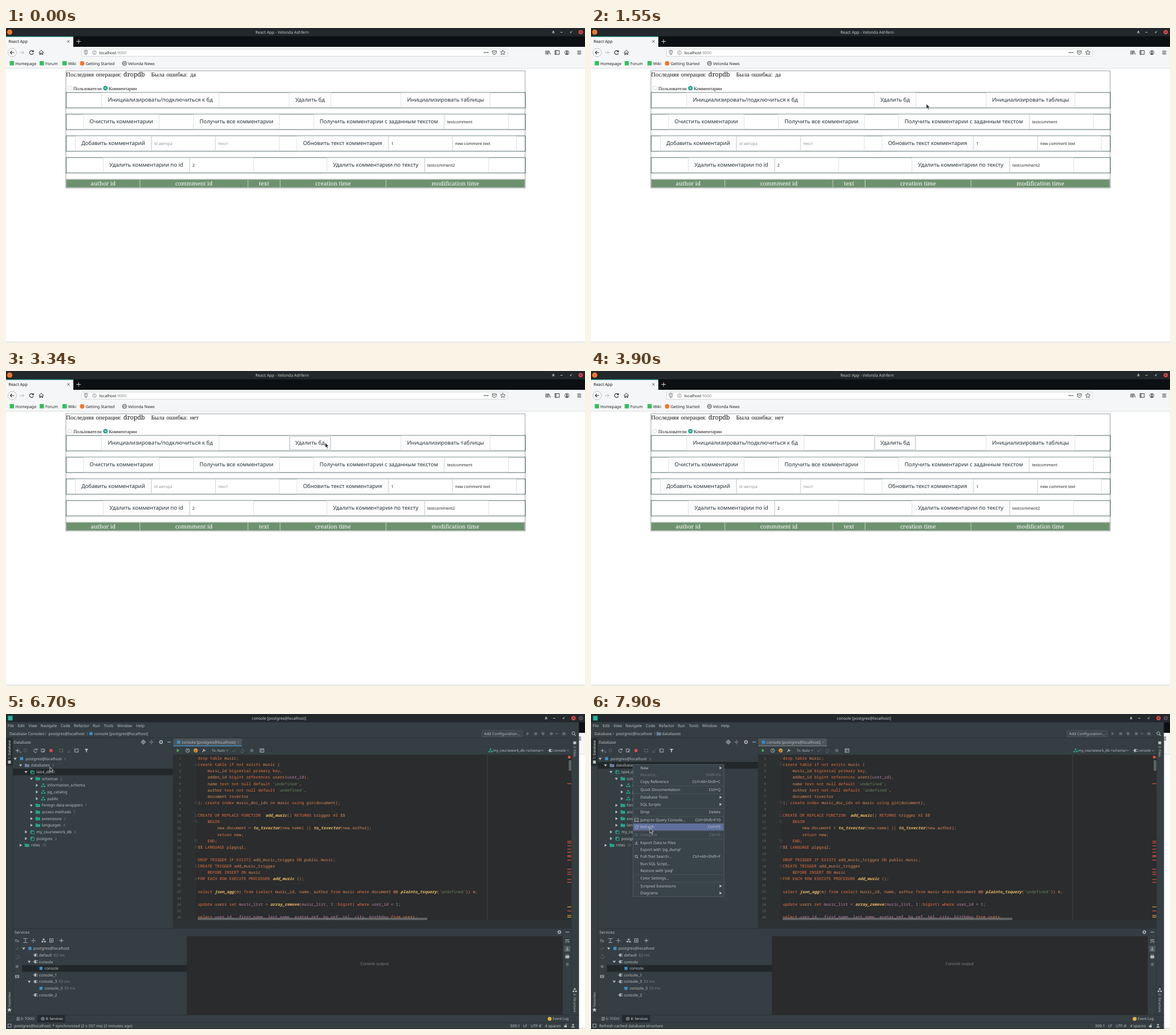
Recreate the animation shown at these times as an HTML page. Size 1015 px wide and 552 px high, loop 8 s.

```html
<!DOCTYPE html>
<html lang="ru">
<head>
<meta charset="utf-8">
<title>Console demo</title>
<style>
html, body { margin: 0; width: 100%; height: 100%; overflow: hidden; background: #fff; }
svg { display: block; width: 1015px; height: 552px; text-rendering: geometricPrecision; }
text { font-family: "Noto Sans", "Open Sans", sans-serif; white-space: pre; }
.serif { font-family: "Liberation Serif", serif; word-spacing: .09em; }
.head { font-family: "Noto Serif", serif; }
.code { font-family: "Noto Sans Mono", "DejaVu Sans Mono", monospace; }
.fn { fill: #f0bd68; font-weight: 600; font-style: italic; }
.kw { fill: #ea713f; } .id { fill: #e08a58; } .str { fill: #6a8759; }
.num { fill: #7aa5c8; } .col { fill: #c07fae; }
</style>
</head>
<body>
<svg id="stage" viewBox="0 0 1015 552"></svg>
<script>
const LOOP = 8000;
const text = (x, y, s, size = 6.87, fill = '#bcc2c4', extra = '') =>
  `<text x="${x}" y="${y}" font-size="${size}" fill="${fill}" ${extra}>${s}</text>`;
const rect = (x, y, w, h, fill, extra = '') =>
  `<rect x="${x}" y="${y}" width="${w}" height="${h}" fill="${fill}" ${extra}/>`;
const frame = (x, y, w, h, stroke, fill = 'none', sw = 1) =>
  rect(x, y, w, h, fill, `stroke="${stroke}" stroke-width="${sw}"`);
const circle = (x, y, r, fill, extra = '') => `<circle cx="${x}" cy="${y}" r="${r}" fill="${fill}" ${extra}/>`;
const line = (d, stroke, w = 1) => `<path d="${d}" fill="none" stroke="${stroke}" stroke-width="${w}"/>`;
const shape = (d, fill) => `<path d="${d}" fill="${fill}"/>`;
const during = (from, to, body) => `<g data-on="${from} ${to}">${body}</g>`;
const middle = 'text-anchor="middle"', end = 'text-anchor="end"';

/* ---------- browser ---------- */
function windowButtons(x, closeFill) {
  const c = '#cfd3d5';
  return shape(`M${x - 2} 7.2h4l-2-2.6zM${x - 2} 8h4v.9h-4z`, c) + line(`M${x + 12.5} 7.5h3.5`, c, .9) +
    line(`M${x + 29.5} 8.5l3.5-3.5M${x + 30} 6.2v2h2`, c, .7) +
    circle(x + 48, 7.2, 3.8, closeFill) + line(`M${x + 46.5} 5.7l3 3m0-3l-3 3`, '#24292c', .9);
}

function button(x, w, y, label) {
  return frame(x + .5, y + .5, w - 1, 25.5, '#d9dcdc', '#fcfcfc', .8) +
    text(x + w / 2, y + 16.3, label, 9.5, '#263238', middle);
}
function input(x, y, value, fill = '#222') {
  return frame(x + .5, y + .5, 111.5, 25.5, '#d4d6d6', '#fff', .8) + text(x + 4.8, y + 15.6, value, 7.05, fill);
}

function browser() {
  const ink = '#2b2f33', hint = '#8e9296';
  let s = rect(0, 0, 1015, 552, '#fff') + rect(0, 0, 1015, 15, '#22282b') + rect(0, 14.5, 1015, 18.5, '#0d1012') +
    circle(6.5, 7.2, 4.6, '#f2762e') +
    text(484, 9.7, 'React App - Velonda Ashfern', 7.05, '#c9cdcf', middle) + windowButtons(959.5, '#e0484a') +
    rect(0, 15, 118, 18, '#f5f6f7') + rect(0, 14.6, 118, 1.2, '#2aa693') +
    text(4.5, 26.3, 'React App', 7.05, '#111') + line('M107.4 21.5l4 4m0-4l-4 4', '#333', .9) +
    line('M123.5 23.5h7.5m-3.75-3.75v7.5', '#e8e8e8', .9) +
    rect(0, 33, 1015, 37, '#f5f6f7') + rect(0, 70, 1015, .7, '#cfd1d3');
  s += circle(10.8, 43, 7.3, '#fff', 'stroke="#9a9da0" stroke-width=".7"') +
    line('M14.5 43h-7m3-3l-3 3 3 3', ink, 1.1) + line('M24 43h7.5m-3-3l3 3-3 3', '#b4b6b8', 1) +
    line('M47.7 41.2a3.4 3.4 0 1 0 .3 3M48.2 39v2.6h-2.6', ink, 1.1) +
    line('M57.5 43l4.3-4 4.3 4M59 42.5v4h1.7v-2.6h2.2v2.6h1.7v-4', ink, 1) +
    rect(132.5, 37, 746.5, 12.4, '#fff', 'rx="1" stroke="#c4c6c8" stroke-width=".7"') +
    line('M137 39.8l3-.8 3 .8c0 4-1 6-3 7.2-2-1.2-3-3.2-3-7.2zM140 39v7.5', '#55595d', .8) +
    circle(155, 43.1, 3.3, 'none', 'stroke="#666" stroke-width=".7"') + line('M155 42.5v2.4M155 41v.8', '#666', .8) +
    text(163.5, 45.6, 'localhost<tspan fill="#86898c">:9000</tspan>', 7.05, '#1d2022');
  for (const x of [838.5, 841.5, 844.5]) s += circle(x, 43, .9, ink);
  s += line('M852.5 40h7v2.6c0 5-7 5-7 0zM854.2 41.8l1.8 1.8 1.8-1.8', ink, .9) +
    line('M871 38.8l1.2 2.8 3 .2-2.3 2 .8 3-2.7-1.7-2.7 1.7.8-3-2.3-2 3-.2z', ink, .8) +
    line('M946.3 39.5v7M948.5 39.5v7M950.5 39.5v7M951.8 39.8l2.2 6.6', ink, 1) +
    frame(962.5, 39.6, 7.4, 6.6, ink, 'none', .9) + rect(962.5, 39.6, 3, 6.6, ink, 'opacity=".4"') +
    circle(983.3, 43, 3.7, 'none', `stroke="${ink}" stroke-width=".8"`) + circle(983.3, 42, 1.4, ink) +
    shape('M981 45.2q2.3-2.2 4.6 0q-2.3 1.8-4.6 0z', ink) +
    line('M1001.5 40.5h6.8m-6.8 2.5h6.8m-6.8 2.5h6.8', ink, 1);
  for (const [x, label] of [[6.5, 'Homepage'], [59, 'Forum'], [99, 'Wiki']])
    s += rect(x, 58, 7.5, 7.5, '#35bf5c') + text(x + 10, 64.5, label, 7.05, '#1d2022');
  s += circle(133.5, 62, 3.9, '#f2762e') + text(139.7, 64.5, 'Getting Started', 7.05, '#1d2022') +
    circle(207.7, 62, 3.7, 'none', 'stroke="#444" stroke-width=".8"') +
    line('M204 62h7.4M207.7 58.3v7.4M206 58.8q-1.4 3.2 0 6.4M209.4 58.8q1.4 3.2 0 6.4', '#444', .5) +
    text(214, 64.5, 'Velonda News', 7.05, '#1d2022');

  s += frame(105, 75, 805, 205, '#8f9393', 'none', .9) +
    text(105.3, 85.4, 'Последняя операция:', 10.6, '#111', 'class="serif"') +
    text(205.8, 85.4, 'dropdb', 10.75, '#111', 'class="head"') +
    text(254.5, 85.4, 'Была ошибка:', 10.6, '#111', 'class="serif"') +
    during(0, 2170, text(322.7, 85.4, 'да', 10.6, '#111', 'class="serif"')) +
    during(2170, LOOP, text(322.7, 85.4, 'нет', 10.6, '#111', 'class="serif"')) +
    circle(112, 105.4, 3.6, '#fff', 'stroke="#cdd0d0" stroke-width=".8"') +
    text(118, 109.3, 'Пользователи', 8.46, '#111', 'class="serif"') +
    circle(174.3, 105.4, 3.9, '#1fa58a') + circle(174.3, 105.4, 1.2, '#d9f2ec') +
    text(180.2, 109.3, 'Комментарии', 8.46, '#111', 'class="serif"');
  for (const y of [113, 151, 189, 227]) s += frame(105.5, y, 805, 27, '#3c5a5a', 'none', .9);
  s += button(167, 207, 113, 'Инициализировать/подключиться к бд') + button(496, 74, 113, 'Удалить бд') +
    button(692, 157, 113, 'Инициализировать таблицы') +
    button(135.5, 133.5, 151, 'Очистить комментарии') + button(328, 152, 151, 'Получить все комментарии') +
    button(538.5, 230, 151, 'Получить комментарии с заданным текстом') + input(768.5, 151, 'testcomment') +
    button(121, 134, 189, 'Добавить комментарий') + input(255, 189, 'id автора', hint) + input(367, 189, 'текст', hint) +
    button(509.5, 161, 189, 'Обновить текст комментария') + input(670.5, 189, '1') + input(782.5, 189, 'new comment text') +
    button(170, 152, 227, 'Удалить комментарии по id') + input(322, 227, '2') +
    button(562, 172, 227, 'Удалить комментарии по тексту') + input(734, 227, 'testcomment2');
  s += during(1940, 2060, rect(497, 114, 72, 24.5, '#b9c2c2', 'opacity=".35"')) +
    during(1980, LOOP, frame(497.6, 114.8, 70.8, 23, '#c4c9c9', 'none', .9));
  s += rect(105.5, 265, 804.5, 15, '#c9d3c9') + frame(105.5, 265, 804.5, 15, '#8f9393', 'none', .7);
  const cells = [106.2, 235.2, 424.6, 481, 666.6, 909.8];
  ['author id', 'commment id', 'text', 'creation time', 'modification time'].forEach((label, i) => {
    const x = cells[i], w = cells[i + 1] - x - 1;
    s += rect(x, 266, w, 13, '#6d926e') + text(x + w / 2, 275.8, label, 9.85, '#fff', `class="head" ${middle}`);
  });
  for (let i = 0; i < 4; i++) s += rect(0, 548 + i, 1015, 1, '#000', `opacity="${.025 * (i + 1)}"`);
  return s;
}

/* ---------- database IDE ---------- */
const panel = '#353e42', editor = '#2a2c2d', selected = '#22282a', ink = '#b9c0c2', dim = '#7d878b', teal = '#23a38b', blue = '#3a8fcb';
const small = 6.1, ideWidth = 1004.3;

const sql = `drop table music;
create table if not exists music (
    music_id bigserial primary key,
    adder_id bigint references users(user_id),
    name text not null default 'undefined',
    author text not null default 'undefined',
    document tsvector
); create index music_doc_idx on music using gin(document);

CREATE OR REPLACE FUNCTION  add_music() RETURNS trigger AS $$
    BEGIN
        new.document = to_tsvector(new.name) || to_tsvector(new.author);
        return new;
    END;
$$ LANGUAGE plpgsql;

DROP TRIGGER IF EXISTS add_music_trigger ON public.music;
CREATE TRIGGER add_music_trigger
    BEFORE INSERT ON music
FOR EACH ROW EXECUTE PROCEDURE add_music ();

select json_agg(m) from (select music_id, name, author from music where document @@ plainto_tsquery('undefined')) m;

update users set music_list = array_remove(music_list, 1::bigint) where user_id = 1;

select user_id,  first_name, last_name, avatar_ref, bg_ref, tel, city, birthday from users;`.split('\n');

const kinds = [
  ['str', /^'/], ['num', /^\d/],
  ['fn', /^(to_tsvector|json_agg|add_music|array_remove|plainto_tsquery)$/],
  ['col', /^(user_id|first_name|last_name|avatar_ref|bg_ref|tel|city|birthday|music_list)$/],
  ['kw', /^([A-Z]+|drop|table|create|if|not|exists|primary|key|references|null|default|text|bigint|bigserial|index|on|using|return|select|from|where|update|set)$/],
  ['id', /./]
];
const paint = row => row.replace(/'[^']*'|\w+|[^\w\s']+/g, w =>
  `<tspan class="${kinds.find(k => k[1].test(w))[0]}">${w}</tspan>`);

const down = (x, y) => shape(`M${x - 2.6} ${y - 1.6}h5.2l-2.6 4z`, ink);
const right = (x, y) => shape(`M${x - 1.6} ${y - 2.6}v5.2l4-2.6z`, ink);
const folder = (x, y, c) => shape(`M${x - 4} ${y - 3}h3l1 1h4v5h-8z`, c);
const store = (x, y, c) => rect(x - 3.5, y - 3, 5.5, 6, c, 'rx="1"') + frame(x - 1.8, y - 1.4, 5, 4.6, c, panel, .9);
const blocks = (x, y, c) => rect(x - 1.5, y - 3.3, 3, 2.6, c) + rect(x - 3.7, y + .6, 3, 2.6, c) + rect(x + .7, y + .6, 3, 2.6, c);
const schema = (x, y) => blocks(x, y, teal);
const plug = (x, y) => line(`M${x - 4} ${y}h2.2M${x + 1} ${y - 1.6}h3M${x + 1} ${y + 1.6}h3`, ink, .9) + rect(x - 2, y - 2.8, 3, 5.6, ink, 'rx="1"');
const mark = (x, y) => rect(x - 2.7, y - 2.7, 5.4, 5.4, blue);

function dataTree() {
  const rows = [
    [0, 'd', 'postgres@localhost', 3, 'm'], [1, 'd', 'databases', 3, 'f'], [2, 'd', 'lab4_db', 3, 's'],
    [3, 'd', 'schemas', 3, 'F'], [4, 'r', 'information_schema', '', 'c'], [4, 'r', 'pg_catalog', '', 'c'],
    [4, 'r', 'public', '', 'c'], [3, 'r', 'foreign data wrappers', 1, 'F'], [3, 'r', 'access methods', 7, 'F'],
    [3, 'r', 'extensions', 2, 'F'], [3, 'r', 'languages', 4, 'F'], [2, 'r', 'my_coursework_db', 3, 's'],
    [2, 'r', 'postgres', 3, 's'], [1, 'r', 'roles', 10, 'F']
  ];
  const icons = { m: mark, f: (x, y) => folder(x, y, '#6d7fa0'), F: (x, y) => folder(x, y, teal), s: (x, y) => store(x, y, teal), c: schema };
  let s = during(0, 6960, rect(12, 95.7, 281, 11.7, selected)) + during(6960, LOOP, rect(12, 84, 281, 11.7, selected));
  rows.forEach(([depth, arrow, label, count, icon], i) => {
    const x = 16 + depth * 9.5, y = 78.3 + i * 11.67;
    s += (arrow === 'd' ? down : right)(x, y) + icons[icon](x + 11.3, y) +
      text(x + 18.3, y + 2.4, `${label}<tspan dx="4" font-size="${small}" fill="${dim}">${count}</tspan>`);
  });
  return s;
}

function services() {
  const rows = [[0, 'd', 'postgres@localhost', ''], [1, '', 'default', '82 ms'], [1, 'd', 'console', ''], [2, '', 'console', ''],
    [1, '', 'console_1', ''], [1, 'd', 'console_3', '53 ms'], [2, '', 'console_3', '53 ms'], [1, '', 'console_2', '']];
  let s = rect(0, 376, 1003, 151, panel) + rect(12, 375.5, 991, .8, '#293033') + text(15, 384.7, 'Services') +
    rect(317, 389.5, 659, 138, '#2a2b2c') + rect(28, 440, 289, 11.7, selected) +
    text(646, 439.8, 'Console output', 6.87, '#7f8688', middle);
  rows.forEach(([depth, arrow, label, time], i) => {
    const x = 31 + depth * 9.7, y = 410.8 + i * 11.65;
    if (arrow) s += down(x, y);
    s += (depth === 1 ? plug : mark)(x + 11, y) +
      text(x + 17, y + 2.4, `${label}<tspan dx="3" fill="${dim}">${time}</tspan>`);
  });
  s += text(15.5, 399.7, 'Tx', 7, ink) + line('M30.5 393.5h7M30.5 400.5h7M34 394.8v4.4M44.5 397h7M48 393v2.6M48 401v-2.6', ink, .9) +
    blocks(66, 397, ink) + frame(76.5, 393.8, 6, 6, ink, 'none', .9) + line('M79.5 395v3.6M77.7 396.8h3.6', ink, .8) +
    line('M93.5 397h7M97 393.5v7', ink, 1) + line('M17 411l1.8 2 3.4-4.2M17.2 426a3 3 0 1 0 1-2.6', '#687277', .9) +
    rect(17, 440, 5, 5, '#626c70') + frame(16.5, 458, 6, 4, ink, 'none', .9) + line('M16.5 460h6', ink, .8) +
    circle(970, 382.2, 2.3, 'none', `stroke="${ink}" stroke-width="1.5"`) + line('M981 382.2h6', ink, 1) +
    line('M980.5 395.5h7M980.5 398h6q2 1.5-1 2.5h-1M980.5 400.5h2', ink, .9) +
    rect(978.5, 406, 11, 11, '#4c575c') + line('M981 414h6M984 408v4.5m-2-2l2 2 2-2', ink, .9) +
    rect(980.5, 423.5, 7, 4, ink) + frame(982, 421.8, 4, 6.4, ink, 'none', .7) + rect(981.8, 436, 4.5, 5.4, '#626c70');
  return s;
}

function editorPane() {
  let s = rect(293, 56.5, 698, 305, editor) + rect(293, 42, 710, 14.5, panel) + rect(293, 56.5, 710, 15, panel) +
    rect(293, 43, 120.5, 13, '#4a555a') + during(0, 7260, rect(293, 55, 120.5, 1.6, '#4a88b8')) +
    during(7260, LOOP, rect(293, 55, 120.5, 1.6, '#6c777c')) + mark(302.5, 49.3) +
    text(308, 51.8, 'console [postgres@localhost]') + line('M405.5 47.7l3.2 3.2m0-3.2l-3.2 3.2', dim, .7) +
    rect(293, 71.5, 40, 290, '#2d3031') + line('M844 71.5V361', '#45494a', .8);
  for (const n of [2, 8, 10, 11, 14, 15, 18, 20])
    s += frame(331.4, 75.8 + (n - 1) * 11.12, 3.4, 3.4, '#565c5f', editor, .5);
  sql.forEach((row, i) => {
    const y = 80.1 + i * 11.12;
    s += text(307, y - .2, i + 1, 5.8, '#697073', `class="code" ${end}`) +
      text(336.3, y, paint(row), 7.055, '#d0d0d0', 'class="code"');
  });
  s += rect(336, 357, 402.5, 4, '#8a8f91', 'opacity=".55"') + rect(293, 361, 698, 14.5, '#2d3335') +
    rect(986.5, 81, 4.5, 18.5, '#777d80', 'opacity=".7"') + circle(987.5, 75.5, 2.6, '#d9503f');
  for (const y of [122, 223, 226, 231, 237, 242, 248, 250, 256, 272, 277, 281, 290, 295, 345]) s += rect(984, y - .6, 7, 1.3, '#d9503f');
  for (const y of [338, 353, 356]) s += rect(984, y - .6, 7, 1.3, '#d9a23c');
  s += shape('M299.5 61l5 3-5 3z', '#4fae56') + circle(318.5, 64, 3.2, 'none', `stroke="${ink}" stroke-width=".9"`) +
    line('M318.5 62v2h1.6', ink, .8) + circle(332.5, 64, 3.4, '#e5a33c') + text(332.5, 66, 'p', 5.5, '#333', middle) +
    line('M344 66.7l4-4m-.8-1.5a1.8 1.8 0 1 0 2.4 2.4', ink, 1.2) + text(360.5, 66.2, 'Tx: Auto', small) +
    line('M386 63l1.7 1.8 1.7-1.8', ink, .8) + line('M397 64l2 2.2 4-4.4M411.5 65.5a2.7 2.7 0 1 0 .7-2.6', '#687277', .9) +
    rect(428.5, 61.5, 5, 5, '#626c70') + frame(445.5, 61, 6.5, 6, ink, 'none', .9) + line('M445.5 63h6.5M448 63v4', ink, .7) +
    schema(849.5, 64) + text(854, 66.2, 'my_coursework_db.&lt;schema&gt;', small) + line('M939.5 63.2l1.6 1.6 1.6-1.6', ink, .7) +
    plug(954, 64) + text(959.3, 66.2, 'console', small) + line('M983.5 63.2l1.6 1.6 1.6-1.6', ink, .7);
  return s;
}

function ide() {
  let s = rect(0, 0, ideWidth, 552, panel) + rect(0, 0, 1015, 14.5, '#22282b') + rect(3.5, 3.3, 8, 8, '#25b69b');
  s += during(0, 5760, text(478.5, 9.7, 'console [postgres@localhost]', 6.9, '#8d9395', middle) +
    windowButtons(946.8, '#858b8e') + circle(1007.5, 7.2, 3.8, '#e0484a') + line('M1006 5.7l3 3m0-3l-3 3', '#24292c', .9));
  s += during(5760, LOOP, text(478.5, 9.7, 'console [postgres@localhost]', 6.9, '#d0d4d6', middle) +
    windowButtons(946.8, '#e0484a') + circle(1007.5, 7.2, 3.8, '#4c5356') + line('M1006 5.7l3 3m0-3l-3 3', '#24292c', .9));
  const menus = [[3, 'File'], [20.5, 'Edit'], [39.5, 'View'], [60.5, 'Navigate'], [96, 'Code'], [119, 'Refactor'],
    [152, 'Run'], [171.5, 'Tools'], [195, 'Window'], [228, 'Help']];
  for (const [x, label] of menus) s += text(x, 23.3, label);

  const sep = x => line(`M${x} 31.8l2 2.6-2 2.6`, dim, .8);
  s += during(0, 7600, text(6, 37, 'Database Consoles') + sep(68.5) + text(74.5, 37, 'postgres@localhost') + sep(141.5) +
    mark(149, 34.4) + text(154.5, 37, 'console [postgres@localhost]')) +
    during(7600, LOOP, text(6, 37, 'Database') + sep(38) + text(44, 37, 'postgres@localhost') + sep(111) +
    folder(119, 34.4, '#6d7fa0') + text(124.5, 37, 'databases'));
  s += rect(834.5, 29, 70.5, 11, '#3b454a', 'rx="1.5" stroke="#5c676c" stroke-width=".7"') +
    text(869.7, 36.9, 'Add Configuration...', 6.75, ink, middle) + shape('M912.5 31.5l5 3-5 3z', '#626c70') +
    circle(928.5, 34.5, 2.6, '#626c70') + line('M925 32l7 5m0-5l-7 5', '#626c70', .7) +
    shape('M939 31.5l5 1v3l-2.5 2.5-2.5-2.5z', '#626c70') + circle(956, 34.5, 2.8, '#626c70') +
    line('M964 33.6l1.6 1.6 1.6-1.6', ink, .8) + rect(975.5, 32, 5, 5, '#626c70') +
    circle(994.5, 33.8, 2.6, 'none', `stroke="${ink}" stroke-width="1"`) + line('M996.4 35.8l2.3 2.3', ink, 1.1) +
    rect(0, 41.3, 1003, .8, '#293033');

  s += text(13.5, 51.8, 'Database') + circle(240.7, 49.2, 3, 'none', `stroke="${ink}" stroke-width=".9"`) +
    line('M240.7 45v8.4M236.5 49.2h8.4M251.5 49.2h7M255 45.5v2.2M255 53v-2.2', ink, .8) +
    circle(271.7, 49.2, 2.4, 'none', `stroke="${ink}" stroke-width="1.5"`) + line('M283 49.2h6', ink, 1) +
    line('M17 64.2h6.5M20.2 61v6.5M24 66l1.4 1.4 1.4-1.4', ink, .9) + frame(32, 61.5, 4, 5, '#626c70', 'none', .8) +
    line('M54 62.5a3 3 0 1 0 .3 3M54.5 60.7v2.2h-2.2', ink, 1) + frame(62, 61.5, 5, 5, ink, 'none', .9) + line('M64 67l4-4', ink, 1) +
    rect(76.3, 61.5, 5.2, 5.2, '#d9504c') + frame(93.5, 61.5, 6, 5, '#626c70', 'none', .9) + line('M108 67l4.5-4.5M107 67h6', '#626c70', .9) +
    frame(120.5, 61.3, 6.4, 5.6, ink, 'none', .8) + line('M121.5 63l1.4 1.2-1.4 1.2M124 66h2', ink, .6) +
    shape('M137.8 61h6.6l-2.5 3v3.6l-1.6-1v-2.6z', ink) + dataTree() + rect(292.5, 42, .8, 334, '#293033');
  s += editorPane() + services();

  s += rect(0, 42, 12, 485, panel) + rect(0, 42, 11.5, 49, '#262d30') + rect(11.5, 42, .7, 485, '#293033') +
    rect(991.5, 42, ideWidth - 991.5, 485, panel) + rect(991.3, 42, .6, 485, '#293033');
  const side = (x, y, label, turn, fill = ink) => text(0, 0, label, 6, fill, `transform="translate(${x} ${y}) rotate(${turn})"`);
  s += side(8, 79, '1: Database', -90, '#dfe3e4') + rect(3.5, 81.5, 5, 5.5, ink, 'rx="1"') +
    side(8, 513, 'Favorites', -90) + shape('M6 514.5l1.2 2.6 2.8.2-2.1 1.8.7 2.8-2.6-1.6-2.6 1.6.7-2.8-2.1-1.8 2.8-.2z', ink) +
    rect(994.5, 48, 5, 5, ink) + side(995, 56, '2: Files', 90) + side(995, 490, 'Z: Structure', 90) + blocks(997, 484, ink);

  s += rect(0, 527, ideWidth, 25, panel) + rect(0, 527, ideWidth, .8, '#293033') + rect(0, 540, ideWidth, .7, '#293033') +
    rect(54.5, 528, 49, 12, '#242b2e') + line('M18.5 532h5.5m-5.5 2.2h5.5m-5.5 2.2h5.5', ink, .9) + text(26, 536.4, '6: TODO', small) +
    circle(64.5, 534, 2.7, 'none', `stroke="${ink}" stroke-width=".9"`) + shape('M63.8 532.6l2.2 1.4-2.2 1.4z', ink) +
    text(69.7, 536.4, '8: Services', small, '#dfe3e4') + circle(953, 534.2, 3.4, '#e5b03c') + text(958.3, 536.4, 'Event Log', small) +
    frame(3.5, 543.3, 5.5, 5.5, ink, 'none', .8) +
    during(0, 7860, text(14.5, 548.6, 'postgres@localhost: * synchronized (2 s 357 ms) (2 minutes ago)')) +
    during(7860, LOOP, text(14.5, 548.6, 'Refresh cached database structure')) +
    text(883.5, 548.6, '309:1') + text(906.5, 548.6, 'LF') + text(920, 548.6, 'UTF-8') + text(945, 548.6, '4 spaces') +
    rect(978.5, 545.5, 4.5, 3.6, ink) + line('M981 545.5v-1.4q1.4-1.8 2.8 0', ink, .8) +
    circle(994, 544.6, 1.6, ink) + shape('M990.8 549.4q3.2-4.6 6.4 0z', ink) + rect(0, 551.2, ideWidth, .8, '#1d2224');
  return s + during(7260, LOOP, contextMenu());
}

/* centre y, label, shortcut ('>' opens a submenu), disabled */
const items = [
  [94.5, 'New', '>'], [106.5, 'Rename...', 'Shift+F6', 1], [118.8, 'Copy Reference', 'Ctrl+Alt+Shift+C'],
  [132.4, 'Quick Documentation', 'Ctrl+Q'], [146, 'Database Tools', '>'], [158.3, 'SQL Scripts', '>'],
  [172, 'Drop', 'Delete'], [185.8, 'Jump to Query Console...', 'Ctrl+Shift+F10'], [198, 'Refresh', 'Ctrl+F5'],
  [211.8, 'Compare', 'Ctrl+D', 1], [225.6, 'Export Data to Files', ''], [237.8, "Export with 'pg_dump'", ''],
  [250, 'Full-Text Search...', 'Ctrl+Alt+Shift+F'], [262.2, 'Run SQL Script...', ''], [274.4, "Restore with 'psql'", ''],
  [288, 'Color Settings...', ''], [301.6, 'Scripted Extensions', '>'], [313.9, 'Diagrams', '>']
];
function contextMenu() {
  let s = frame(73.8, 88.6, 159.4, 231.4, '#586267', '#39434a', .8) +
    rect(74.3, 0, 158.4, 12.2, '#60709c', 'id="hover"');
  for (const y of [125.6, 139.2, 165.2, 178.9, 204.9, 218.7, 281.2, 294.8]) s += rect(74.5, y, 158, .6, '#515b60');
  for (const [y, label, key, off] of items) {
    const c = off ? '#737c80' : '#c0c6c8';
    s += text(86.5, y + 2.4, label, 6.8, c);
    s += key === '>' ? right(227, y) : text(227, y + 2.4, key, 6.7, c, end);
  }
  return s + frame(76.5, 183, 6.4, 5.6, ink, 'none', .8) + line('M77.5 184.7l1.4 1.1-1.4 1.1M80 187.4h2', ink, .6) +
    line('M82.2 196.6a2.7 2.7 0 1 0 .2 2.6M82.6 195v2h-2', ink, .9) + line('M77 210.3h5M77 213.3h5', '#737c80', .9) +
    line('M77 228.4h5.4M79.7 223v3.8m-1.6-1.4l1.6 1.6 1.6-1.6', ink, .8) +
    circle(79.2, 249.4, 2.1, 'none', `stroke="${ink}" stroke-width=".9"`) + line('M80.8 251l1.8 1.8', ink, .9);
}

const stage = document.getElementById('stage');
stage.innerHTML = browser() + during(5680, LOOP, ide()) +
  '<path id="cursor" d="M0 0V8.7L2 7l1.5 3.2 1.5-.7L3.6 6.4l2.7-.2z" fill="#2a2e31" stroke="#f2f3f3" stroke-width=".7"/>';

const cursor = document.getElementById('cursor'), hover = document.getElementById('hover');
const timed = [...document.querySelectorAll('[data-on]')].map(el => [el, ...el.dataset.on.split(' ').map(Number)]);

/* pointer trips: each is a list of [time, x, y] */
const trips = [
  [[490, 487, 43], [800, 575, 130], [1080, 633, 197], [1270, 631, 176], [1310, 629, 173], [1550, 588, 133],
    [1750, 560, 125], [3340, 560, 125], [3600, 430, 300], [3900, 225, 531]],
  [[5760, 225, 541], [6080, 150, 300], [6400, 81, 98], [6620, 81, 98], [6780, 73, 88],
    [7600, 73, 88], [7900, 103, 200], [LOOP, 103, 200]]
];
function pointer(t) {
  const trip = trips.find(p => t >= p[0][0] && t < p[p.length - 1][0]);
  if (!trip) return null;
  const i = trip.findIndex(p => p[0] > t), [t0, x0, y0] = trip[i - 1], [t1, x1, y1] = trip[i];
  const k = (t - t0) / (t1 - t0);
  return [x0 + (x1 - x0) * k, y0 + (y1 - y0) * k];
}

const show = (el, on) => el.style.display = on ? '' : 'none';
function draw(t) {
  for (const [el, from, to] of timed) show(el, t >= from && t < to);
  const p = pointer(t);
  show(cursor, p);
  if (p) cursor.setAttribute('transform', `translate(${p[0]} ${p[1]})`);
  const hit = p && t > 7600 && items.find(([y, , , off]) => !off && Math.abs(p[1] - y) < 6.1);
  show(hover, hit);
  if (hit) hover.setAttribute('y', hit[0] - 6.1);
}

const start = performance.now();
function tick() {
  draw((performance.now() - start) % LOOP);
  requestAnimationFrame(tick);
}
tick();
</script>
</body>
</html>
```
